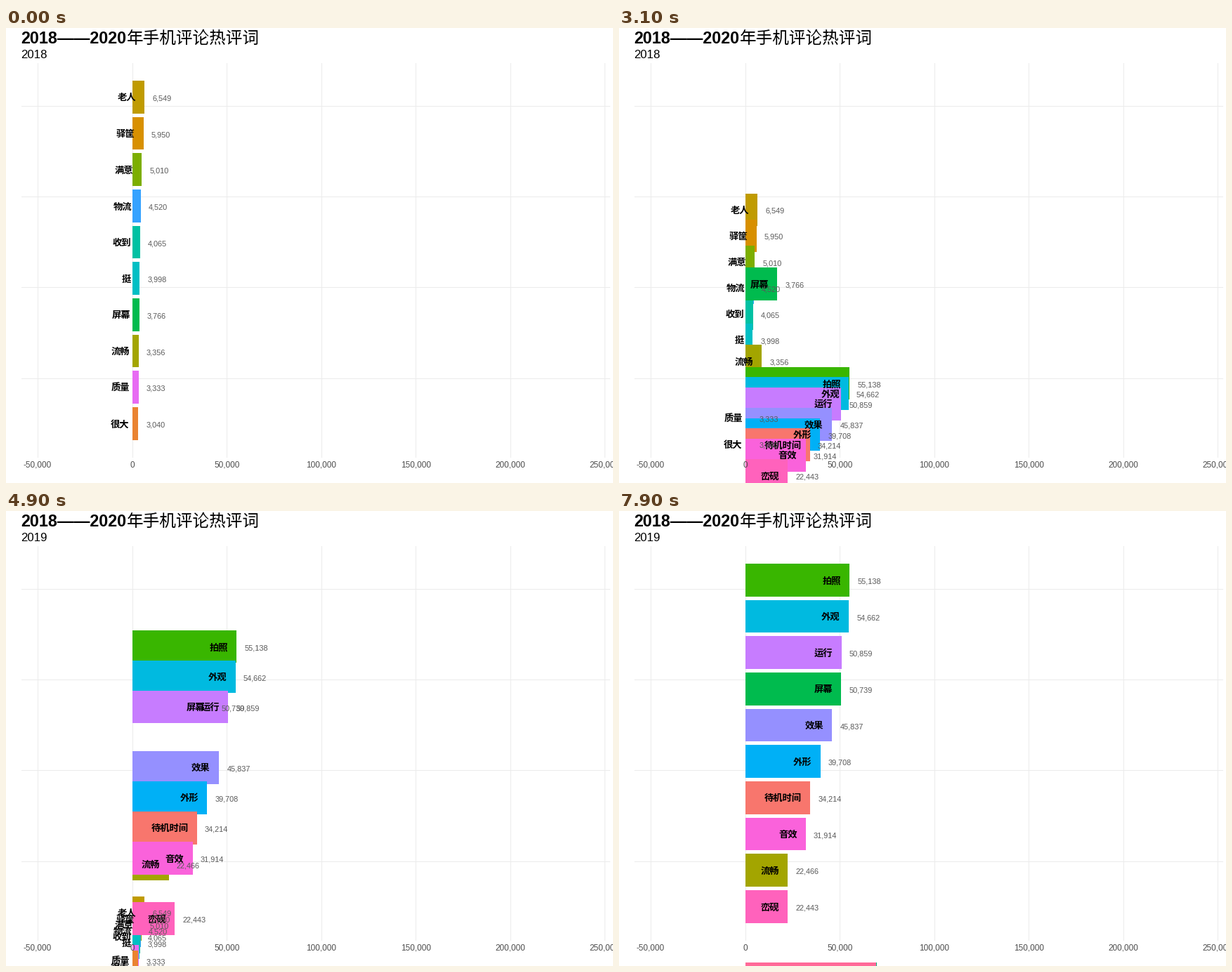
These frames come from a looping animation (864x648 px, 8000 ms). A matplotlib script:

```python
from math import floor

import matplotlib.pyplot as plt
from matplotlib.animation import FuncAnimation
from matplotlib.patches import Rectangle

W, H = 864, 648
FRAMES, STEP = 80, 75          # frames per loop, frames per year change
ZERO, SCALE = 180.15, 134.53 / 50000
TOP, ROW, BAR = 75.65, 51.66, 46.5
OFF = 12                       # rank below the stage
GROW = 130000                  # rise towards the third year
SANS, CJK = "Liberation Sans", "Noto Sans CJK JP"

# word, colour, (rank, value) in the first and the second year
WORDS = [
    ("老人", "#C09B00", (1, 6549), None),
    ("驿筐", "#D89000", (2, 5950), None),
    ("满意", "#7CAE00", (3, 5010), None),
    ("物流", "#35A2FF", (4, 4520), None),
    ("收到", "#00C1A3", (5, 4065), None),
    ("挺", "#00BFC4", (6, 3998), None),
    ("屏幕", "#00BB4E", (7, 3766), (4, 50739)),
    ("流畅", "#A3A500", (8, 3356), (9, 22466)),
    ("质量", "#E76BF3", (9, 3333), None),
    ("很大", "#EA8331", (10, 3040), None),
    ("拍照", "#39B600", None, (1, 55138)),
    ("外观", "#00BAE0", None, (2, 54662)),
    ("运行", "#C77CFF", None, (3, 50859)),
    ("效果", "#9590FF", None, (5, 45837)),
    ("外形", "#00B0F6", None, (6, 39708)),
    ("待机时间", "#F8766D", None, (7, 34214)),
    ("音效", "#FA62DB", None, (8, 31914)),
    ("峦砚", "#FF62BC", None, (10, 22443)),
    ("不错", "#00BF7D", None, None),
    ("速度", "#FF6A98", None, None),
]
LATE = {"不错": (1, 69600), "速度": (2, 69200)}


def x_of(value):
    return ZERO + value * SCALE


def ease(p):
    return 4 * p ** 3 if p < 0.5 else 1 - 4 * (1 - p) ** 3


def third_year(word, second):
    if second:
        return second[0], second[1] + GROW
    return LATE.get(word)


fig = plt.figure(figsize=(W / 72, H / 72), dpi=72, facecolor="white")
ax = fig.add_axes([0, 0, 1, 1])
ax.set_xlim(0, W)
ax.set_ylim(H, 0)
ax.axis("off")


def block(x, y, w, h, color, z):
    return ax.add_patch(Rectangle((x, y), w, h, fc=color, ec="none", zorder=z))


def text(x, y, s, size, color="black", font=SANS, **kw):
    return ax.text(x, y, s, fontsize=size, color=color, family=font,
                   va="baseline", **kw)


for k in range(4):
    block(22, floor(111.6 + 129.15 * k), 838, 1, "#EBEBEB", 0)
for v in range(-50000, 250001, 50000):
    x = x_of(v)
    block(floor(x), 50, 1, 562, "#EBEBEB", 0)
    text(x - 0.5, 625.6, f"{v:,}", 11.8, "#4D4D4D", ha="center", zorder=40)

text(21.5, 22, "2018——2020", 23.2, weight="bold")
text(172, 22, "年手机评论热评词", 23.6, font=CJK)
year = text(21.5, 42.6, "2018", 16.7)

rows = []
for i, (word, color, first, second) in enumerate(WORDS):
    bar = block(floor(ZERO), 0, 1, 1, color, 2 + i * 0.1)
    name = text(0, 0, word, 13.3, font=CJK, weight="bold", ha="right", zorder=20)
    count = text(0, 0, "", 10.9, "#595959", ha="left", zorder=21)
    rows.append(((first, second, third_year(word, second)), bar, name, count))


def draw(frame):
    stage, step = divmod(frame, STEP)
    p = step / STEP
    e = ease(p)
    near = stage + (p >= 0.5)
    year.set_text(str(2018 + near))
    for states, bar, name, count in rows:
        a, b = states[stage:stage + 2]
        shown = bool(a or (b and step))
        for part in (bar, name, count):
            part.set_visible(shown)
        if not shown:
            continue
        a = a or (OFF, b[1])
        b = b or (OFF, a[1])
        top = TOP + ROW * (a[0] + (b[0] - a[0]) * e - 1)
        end = x_of(a[1] + (b[1] - a[1]) * e)
        # bars cover whole pixels only
        bar.set_y(floor(top))
        bar.set_height(floor(top + BAR) - floor(top))
        bar.set_width(floor(end) - floor(ZERO))
        base = top + BAR / 2 + 4.5
        name.set_position((end - 12.8, base))
        count.set_position((end + 10.8, base))
        count.set_text(f"{(b if p >= 0.5 else a)[1]:,}")
    return []


anim = FuncAnimation(fig, draw, frames=FRAMES, interval=100,
                     repeat=True, repeat_delay=0)
plt.show()
```
